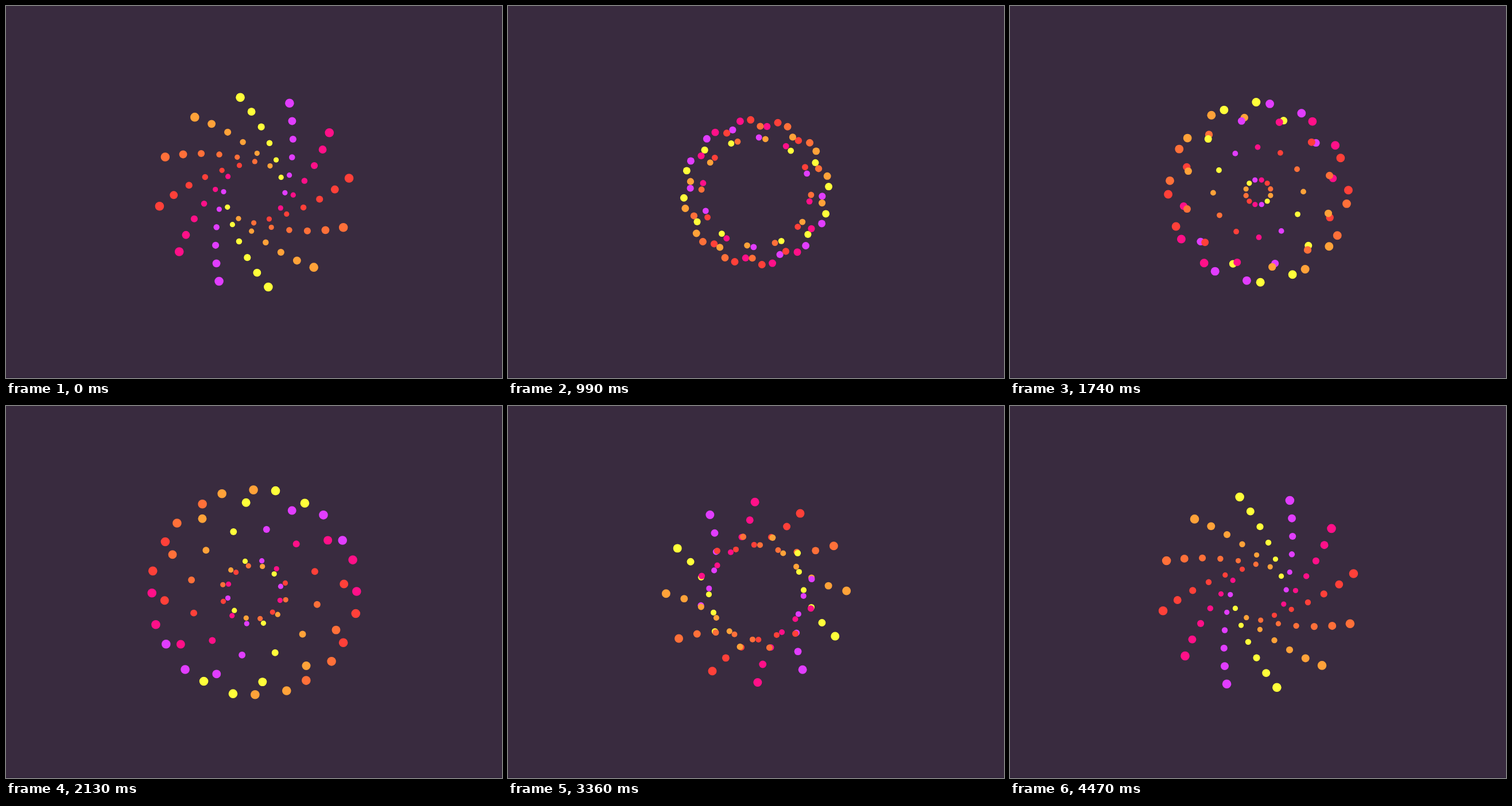
Animation of 864 by 648 pixels, one loop 4500 ms. Source, as an HTML page with a canvas:

```html
<!DOCTYPE html>
<html>
<head>
<meta charset="utf-8">
<style>
  html, body { margin: 0; height: 100%; overflow: hidden; background: #392b3f; }
  canvas { display: block; }
</style>
</head>
<body>
<canvas id="stage" width="864" height="648"></canvas>
<script>
const ctx = document.getElementById('stage').getContext('2d');
const COLORS = ['#ffff3a', '#e13dff', '#ff1088', '#ff4039', '#ff7039', '#ffa239'];
const CENTER = { x: 432.5, y: 324.4 };
const LOOP = 4500, ARMS = 12, DOTS = 6;
const ORBIT = 99, STEP = 31, REACH = 2.5 * STEP;
const rad = deg => deg * Math.PI / 180;

// Dots grow with their distance from the centre.
const dotSize = dist => Math.min(7.8, Math.max(4.6, 4.6 + (dist - 70) * 0.033));

// Angles run clockwise from straight up.
function drawArm(color, heading, turn, bend) {
  let x = ORBIT * Math.sin(heading + turn);
  let y = -ORBIT * Math.cos(heading + turn);
  ctx.fillStyle = color;
  for (let i = 0; i < DOTS; i++) {
    const dx = Math.sin(heading + i * bend), dy = -Math.cos(heading + i * bend);
    if (i) { x -= STEP * dx; y -= STEP * dy; }
    const px = x + REACH * dx, py = y + REACH * dy;
    ctx.beginPath();
    ctx.arc(CENTER.x + px, CENTER.y + py, dotSize(Math.hypot(px, py)), 0, 2 * Math.PI);
    ctx.fill();
  }
}

function draw(ms) {
  const turn = rad(38.25 + 0.0795 * ms);
  const bend = rad(24 - 23.7 * Math.cos(turn + rad(0.7)));
  ctx.fillStyle = '#392b3f';
  ctx.fillRect(0, 0, 864, 648);
  ctx.fillStyle = '#30243a';
  ctx.fillRect(0, 646.5, 864, 1.5);
  for (let k = 0; k < ARMS; k++) {
    drawArm(COLORS[k % COLORS.length], rad(30 * k - 30), turn, bend);
  }
}

const start = performance.now();
function tick() {
  draw((performance.now() - start) % LOOP);
  requestAnimationFrame(tick);
}
tick();
</script>
</body>
</html>
```
